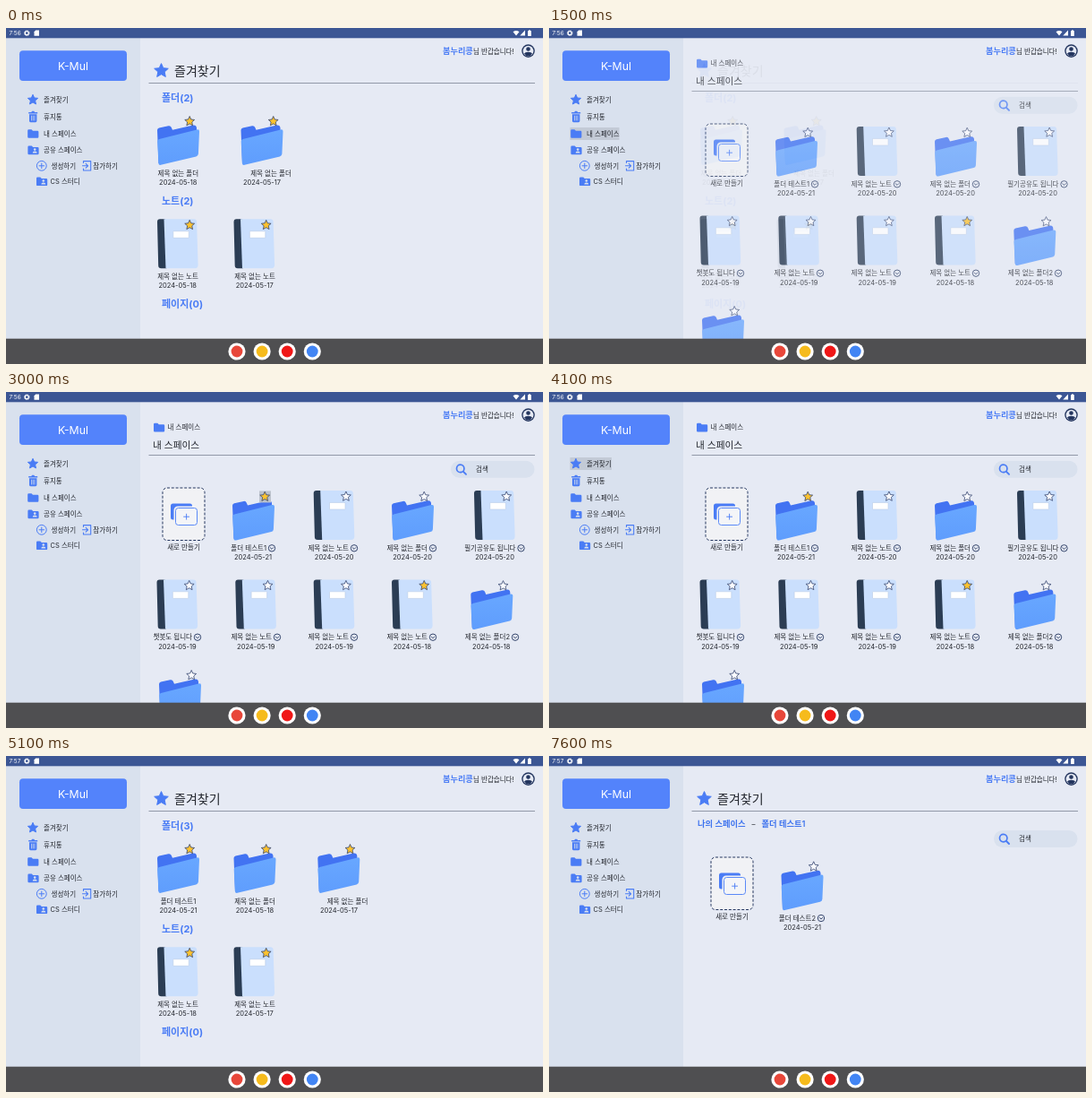
An HTML page that plays this animation: 600x375 px, repeating every 7700 ms.

```html
<!DOCTYPE html>
<html lang="ko">
<head>
<meta charset="utf-8">
<style>
html, body { margin: 0; width: 100%; height: 100%; overflow: hidden; background: #e6eaf4; }
svg { display: block; width: 100vw; height: 100vh; }
text { font-family: Inter, "Noto Sans CJK KR", "Noto Sans CJK", sans-serif; }
</style>
</head>
<body>
<svg id="stage" viewBox="0 0 600 375"></svg>
<script>
const LOOP = 7700;
const BLUE = '#4a7cf5', NAVY = '#24365f', INK = '#23262d', PAGE = '#e6eaf4', PANEL = '#d9e1ee';
const SMALL = 7.5;

// Drawing helpers
const rect = (x, y, w, h, fill, r = 0, extra = '') =>
  `<rect x="${x}" y="${y}" width="${w}" height="${h}" rx="${r}" fill="${fill}" ${extra}/>`;
const circle = (x, y, r, fill, extra = '') => `<circle cx="${x}" cy="${y}" r="${r}" fill="${fill}" ${extra}/>`;
const path = (d, fill, extra = '') => `<path d="${d}" fill="${fill}" ${extra}/>`;
const line = (d, color, width) =>
  path(d, 'none', `stroke="${color}" stroke-width="${width}" stroke-linecap="round" stroke-linejoin="round"`);
const at = (x, y, body) => `<g transform="translate(${x} ${y})">${body}</g>`;
const group = (id, body) => `<g id="${id}">${body}</g>`;
const text = (s, x, y, { size = SMALL, fill = INK, anchor = 'start', weight = 400, id = '' } = {}) =>
  `<text x="${x}" y="${y}" font-size="${size}" fill="${fill}" text-anchor="${anchor}" font-weight="${weight}"${id && ` id="${id}"`}>${s}</text>`;
const centered = (s, x, y) => text(s, x, y, { anchor: 'middle' });

function star(cx, cy, r, fill, stroke = fill, width = 0.8, id = '') {
  const points = Array.from({ length: 10 }, (_, i) => {
    const a = i * Math.PI / 5 - Math.PI / 2, d = i % 2 ? r * 0.47 : r;
    return `${(cx + d * Math.cos(a)).toFixed(2)},${(cy + d * Math.sin(a)).toFixed(2)}`;
  });
  return `<polygon ${id && `id="${id}"`} points="${points.join(' ')}" fill="${fill}" stroke="${stroke}" stroke-width="${width}" stroke-linejoin="round"/>`;
}
const GOLD = '#fcc22f', EMPTY = '#fafbff';
const mark = (x, y, gold, id) => star(x, y, 5.7, gold ? GOLD : EMPTY, '#34456f', 0.8, id);

// Large document icons
const folder = (x, y, gold, id) => at(x, y,
  path('M0 6Q0 4 2 3.5L12.5 1.2Q15 .8 15.8 3L17 5.8L40 .6Q43.6 0 44 3.4L44.5 30L1.5 43Z', '#4273f2') +
  path('M.2 18.5Q.2 16.4 2.2 15.9L44.3 5.4Q47.2 4.8 47 7.6L45.9 32.5Q45.7 34.8 43.4 35.4L4 44.8Q1.6 45.3 1.4 43Z', 'url(#front)') +
  mark(36.2, -3.8, gold, id));
const notebook = (x, y, gold) => at(x, y,
  path('M0 3Q0 0 3 0H9L10.5 55H4.5Q1.2 55 1.2 52Z', '#2b3d54') +
  path('M7.5 0H41Q44 0 44.1 3L45.6 51Q45.6 55 42 55H9.5Z', '#cadffd') +
  rect(17.8, 13.4, 17.5, 7.6, '#fff', 0.5, 'stroke="#b7c9e6" stroke-width=".6"') +
  mark(36.2, 6.7, gold));

// Small interface icons
const miniFolder = (x, y) => at(x, y, path('M0 1.2Q0 0 1.2 0H4.3L5.8 1.5H11Q12.2 1.5 12.2 2.7V8.4Q12.2 9.6 11 9.6H1.2Q0 9.6 0 8.4Z', BLUE));
const sharedFolder = (x, y) => miniFolder(x, y) +
  at(x, y, circle(7.8, 4, 1.3, PANEL) + path('M5.3 8Q5.3 6 7.8 6T10.3 8Z', PANEL));
const trash = (x, y) => at(x, y,
  path('M-5 -5H-2L-1 -6.3H1L2 -5H5V-3.5H-5ZM-4.2 -2.7H4.2V4.8Q4.2 6.2 2.8 6.2H-2.8Q-4.2 6.2 -4.2 4.8Z', BLUE) +
  line('M-1.7 -.8V4M0 -.8V4M1.7 -.8V4', PANEL, 0.7));
const chevron = (x, y) => circle(x, y, 3.7, 'none', `stroke="${NAVY}" stroke-width=".9"`) +
  line(`M${x - 1.7} ${y - 0.6}l1.7 1.7l1.7 -1.7`, NAVY, 0.9);

const searchBox = y => rect(497, y, 93.5, 19, PANEL, 9.5) +
  circle(507.7, y + 8.6, 4.2, 'none', `stroke="${BLUE}" stroke-width="1.7"`) +
  line(`M511 ${y + 12}l3 3`, BLUE, 1.9) + text('검색', 525, y + 12.4);

const newTile = (x, y) => at(x, y,
  rect(0, 0, 47, 58.5, '#f1f2f5', 5, `stroke="${NAVY}" stroke-width="1" stroke-dasharray="3 1.8"`) +
  rect(9, 17.5, 24, 18, BLUE, 2.5) +
  rect(14, 22, 24.5, 20, '#f1f2f5', 3, `stroke="#f1f2f5" stroke-width="3"`) +
  rect(14.5, 22.5, 24, 19, '#f4f5f8', 3, `stroke="#5a89f7" stroke-width="1"`) +
  line('M23.6 32.2h6M26.6 29.2v6', BLUE, 0.9) + centered('새로 만들기', 23.5, 69.3));

const divider = y => rect(159.5, y, 431.5, 1, '#9299a8');
const page = (id, body) => group(id, rect(150, 11, 450, 336, PAGE) + body);
const date = (day, x, y) => centered(`2024-05-${day}`, x, y);
const heading = (s, y) => text(s, 174, y, { size: 11, fill: BLUE, weight: 700 });
const favHeader = star(173.5, 47.8, 8.2, BLUE, BLUE, 1) + text('즐겨찾기', 188, 53, { size: 14 }) + divider(61);

// folders: [icon x, label, label centre, day, date centre]
function favourites(id, folders) {
  const notes = [[169, 192, 18], [254.5, 278, 17]];
  return page(id, favHeader +
    heading(`폴더(${folders.length})`, 82.3) +
    folders.map(([x, name, lx, day, dx]) => folder(x, 108, true) + centered(name, lx, 164.8) + date(day, dx, 175.3)).join('') +
    heading('노트(2)', 197.3) +
    notes.map(([x, c, day]) => notebook(x, 213.3, true) + centered('제목 없는 노트', c, 280) + date(day, c - 0.3, 290.3)).join('') +
    heading('페이지(0)', 312.3));
}

// item: [icon, centre, label, chevron x, day, gold, id]
function gridRow(top, items) {
  return items.map(([icon, center, name, cx, day, gold, id]) =>
    icon(center - 23, icon === folder ? top + 10.7 : top, gold, id) +
    text(name, cx - 6, top + 66.9, { anchor: 'end' }) + chevron(cx, top + 64.3) + date(day, center, top + 77.2)).join('');
}

const UNTITLED = '제목 없는 ';
const space = page('space',
  miniFolder(165, 34.8) + text('내 스페이스', 180.5, 42.2) +
  text('내 스페이스', 164, 63, { size: 10.7 }) + divider(70) + searchBox(76.8) +
  newTile(175, 107) +
  gridRow(110, [
    [folder, 276, '폴더 테스트1', 297, 21, false, 'tappedStar'],
    [notebook, 366.7, UNTITLED + '노트', 389, 20],
    [folder, 454, UNTITLED + '폴더', 477, 20],
    [notebook, 546, '필기공유도 됩니다', 575.5, 20]]) +
  gridRow(209.4, [
    [notebook, 191.5, '챗봇도 됩니다', 214, 19],
    [notebook, 279.3, UNTITLED + '노트', 303, 19],
    [notebook, 366.7, UNTITLED + '노트', 389, 19],
    [notebook, 454, UNTITLED + '노트', 477, 18, true],
    [folder, 542.3, UNTITLED + '폴더2', 569, 18]]) +
  folder(171, 320, false));

const crumb = { size: 9.3, fill: '#3f74ee', weight: 600 };
const detail = page('detail', favHeader +
  text('나의 스페이스', 166, 79, crumb) + text('–', 226.5, 79, { size: 8 }) + text('폴더 테스트1', 237.5, 79, crumb) +
  searchBox(83) + newTile(181, 113) + folder(259.5, 127.3, false) +
  text('폴더 테스트2', 298, 183.8, { anchor: 'end' }) + chevron(304, 181) + date(21, 283, 194));

const sidebar = rect(0, 11, 150, 336, PANEL) +
  rect(15, 25.3, 120, 33.7, '#5383fb', 4) +
  text('K-Mul', 75, 47, { size: 12.3, fill: '#fff', anchor: 'middle' }) +
  rect(23.5, 111, 55, 14, '#c3cad6', 0, 'id="spaceTap"') +
  rect(23.5, 73, 46.5, 14, '#c3cad6', 0, 'id="favTap"') +
  star(30, 80.2, 5.9, BLUE, BLUE, 1) + trash(30.2, 99) + miniFolder(24.2, 113.2) + sharedFolder(24.4, 131.6) +
  circle(39.8, 153.8, 5.4, 'none', `stroke="${BLUE}" stroke-width="1"`) + line('M37 153.8h5.6M39.8 151v5.6', BLUE, 1) +
  line('M86.5 150.5V148.6H94.7V159H86.5V157M85.5 153.8H91.3M89.2 151.4l2.4 2.4l-2.4 2.4', BLUE, 1.1) +
  sharedFolder(34, 166.5) +
  [['즐겨찾기', 42, 83], ['휴지통', 42, 101.9], ['내 스페이스', 42, 120.6], ['공유 스페이스', 42, 139.2],
   ['생성하기', 50.5, 156.6], ['참가하기', 97.3, 156.6], ['CS 스터디', 49.5, 174]].map(a => text(...a)).join('');

const greeting = text('봄누리콩', 488, 29, { size: 9.2, fill: BLUE, weight: 700 }) + text('님 반갑습니다!', 522, 28.5) +
  circle(583.5, 25.6, 7.3, NAVY) + circle(583.5, 25.6, 5.9, PAGE) +
  circle(583.5, 23.5, 2.3, NAVY) + path('M579 28.6Q580 26.8 583.5 26.8T588 28.6Q586.5 31.3 583.5 31.3T579 28.6Z', NAVY);

const statusBar = rect(0, 0, 600, 11.3, '#3c5694') +
  text('7:56', 3.5, 8, { size: 6.5, fill: '#fff', id: 'clock' }) +
  circle(23.3, 5.7, 2, 'none', 'stroke="#fff" stroke-width="1.3"') +
  circle(23.3, 5.7, 2.9, 'none', 'stroke="#fff" stroke-width=".9" stroke-dasharray="1.1 1.18"') +
  path('M31.5 4.2L33.2 2.5H37V8.8H31.5Z', '#fff') +
  path('M566.5 4.2Q570 1.6 573.5 4.2L570 8.6Z', '#fff') + path('M580 2.5V8.6H574.3Z', '#fff') +
  rect(583, 3, 3.8, 6, '#fff', 0.6) + rect(584, 2.3, 1.8, 1, '#fff');

const dock = rect(0, 346.7, 600, 28.3, '#4f4f51') +
  ['#e8473a', '#f6bb1c', '#f01717', '#4285f4'].map((color, i) =>
    circle(258 + 28.1 * i, 361, 9.6, '#fff') + circle(258 + 28.1 * i, 361, 6.4, color)).join('');

const stage = document.getElementById('stage');
stage.innerHTML =
  `<defs><linearGradient id="front" x1="0" y1="0" x2="0" y2="1"><stop stop-color="#68a7ff"/><stop offset="1" stop-color="#5f9dfd"/></linearGradient></defs>` +
  rect(0, 0, 600, 375, PAGE) +
  favourites('favBefore', [[169, '제목 없는 폴더', 192.3, 18, 192.3], [262.5, '제목 없는 폴더', 296, 17, 286]]) +
  space +
  favourites('favAfter', [[169, '폴더 테스트1', 192.5, 21, 192.5], [254.5, '제목 없는 폴더', 278, 18, 278], [348.3, '제목 없는 폴더', 381.5, 17, 372]]) +
  detail + sidebar + greeting + statusBar + dock;

const el = id => document.getElementById(id);
const tappedStar = el('tappedStar');
tappedStar.insertAdjacentHTML('beforebegin', rect(30, -10.3, 13, 13, '#bcc2cc', 0, 'id="starTap"'));

const fade = (t, start) => Math.min(1, Math.max(0, (t - start) / 400));
const setOpacity = (id, value) => el(id).setAttribute('opacity', value);
const during = (t, from, to) => +(t >= from && t < to);

// Each page fades in while the one before it fades out.
const PAGES = [['favBefore', -400], ['space', 1200], ['favAfter', 4200], ['detail', 5500]];

function render(t) {
  PAGES.forEach(([id, start], i) => {
    const next = PAGES[i + 1];
    setOpacity(id, fade(t, start) * (next ? 1 - fade(t, next[1]) : 1));
  });
  setOpacity('spaceTap', during(t, 1100, 1700));
  setOpacity('starTap', during(t, 2800, 3400));
  setOpacity('favTap', during(t, 4000, 4600));
  tappedStar.setAttribute('fill', t >= 2850 ? GOLD : EMPTY);
  el('clock').textContent = t < 4600 ? '7:56' : '7:57';
}

const begin = performance.now();
function tick() {
  render((performance.now() - begin) % LOOP);
  requestAnimationFrame(tick);
}
tick();
</script>
</body>
</html>
```
